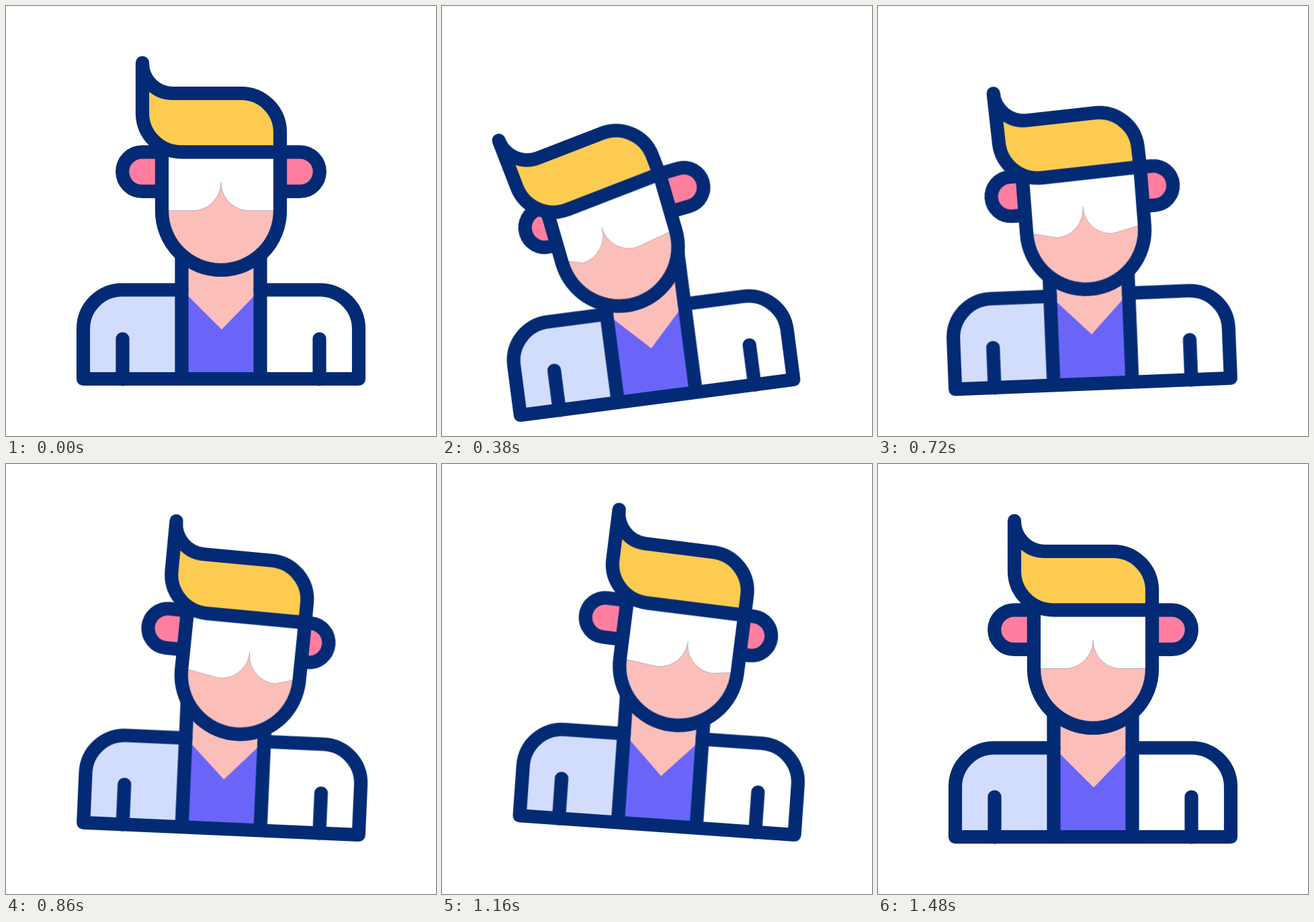
Animation of 640 by 640 pixels, one loop 1.7 s. Source, as an HTML page:

```html
<!DOCTYPE html>
<html lang="en">
<head>
<meta charset="utf-8">
<title>Head tilt</title>
<style>
  html, body { margin: 0; width: 100%; height: 100%; overflow: hidden; background: #fff; }
  svg { display: block; width: 100%; height: 100%; }

  .line { fill: none; stroke: #032b75; stroke-width: 20.2; stroke-linecap: round; stroke-linejoin: round; }
  .hair-shape { fill: #fdcb50; }
  .ear { fill: #ff7ea0; }
  .skin { fill: #fcbeb9; }
  .white { fill: #fff; }
  .sleeve { fill: #d2dcfd; }
  .shirt { fill: #6a65f8; }
  .seam { stroke: #032b75; stroke-width: .5; stroke-opacity: .5; }

  .body, .head, .hair, .ear, .jaw {
    animation: 1700ms cubic-bezier(.33, 0, .67, 1) infinite;
  }
  .body { transform-origin: 320px 555px; animation-name: sway; }
  .head { transform-origin: 320px 305px; animation-name: tilt; }
  .hair { transform-origin: 408px 217px; animation-name: flop; }
  .ear.left { animation-name: ear-left; }
  .ear.right { animation-name: ear-right; }
  .jaw { animation-name: look; }

  @keyframes sway {
    0%, 87.06%, 100% { transform: translate(0, 0) rotate(0deg); }
    27.65% { transform: translate(0, 30.4px) rotate(-8.2deg); }
    59.8% { transform: translate(0, -22.6px) rotate(5.2deg); }
  }
  @keyframes tilt {
    0%, 81.5%, 100% { transform: translate(0, 0) rotate(0deg); }
    27.06% { transform: translate(-29.5px, 22.5px) rotate(-9.5deg); }
    57.9% { transform: translate(26.5px, 20px) rotate(5.4deg); }
  }
  @keyframes flop {
    0%, 57.9%, 100% { transform: rotate(0deg); }
    21.2% { transform: rotate(-5deg); }
  }
  @keyframes ear-left {
    0%, 57.9%, 100% { transform: translateX(0); }
    27.06% { transform: translateX(21px); }
  }
  @keyframes ear-right {
    0%, 27.06%, 83.5%, 100% { transform: translateX(0); }
    57.9% { transform: translateX(-24px); }
  }
  /* the cheeks stay pinned while the lens edge slides */
  @keyframes look {
    0%, 82.5%, 100% { d: path("M242 304.5L278 304.5C301 304.5 320 285.5 320 262C320 285.5 339 304.5 362 304.5L398 304.5A78 78 0 0 1 242 304.5Z"); }
    27.06% { d: path("M242 304.5L260 313.5C283 313.5 302 294.5 302 271C302 294.5 321 313.5 344 313.5L398 304.5A78 78 0 0 1 242 304.5Z"); }
    57.9% { d: path("M242 304.5L293 312C316 312 335 293 335 269.5C335 293 354 312 377 312L398 304.5A78 78 0 0 1 242 304.5Z"); }
  }
</style>
</head>
<body>
<svg viewBox="0 0 640 640">
  <g class="body">
    <path class="sleeve" d="M115 555V480.5A58 58 0 0 1 173 422.5H261.5V555Z"/>
    <path class="white" d="M525 555V480.5A58 58 0 0 0 467 422.5H378.5V555Z"/>
    <path class="skin" d="M261.5 320H378.5V500H261.5Z"/>
    <path class="shirt" d="M261.5 422L321 481.5L378.5 422V555H261.5Z"/>
    <path class="line" d="M261.5 422.5H173A58 58 0 0 0 115 480.5V555H525V480.5A58 58 0 0 0 467 422.5H378.5"/>
    <path class="line" d="M261.5 320V555M378.5 320V555M173.5 495.5V555.5M466.5 495.5V555.5"/>

    <g class="head">
      <path class="line ear left" d="M232 217.3H202.5A29.3 29.3 0 0 0 202.5 275.9H232Z"/>
      <path class="line ear right" d="M408 217.3H437.5A29.3 29.3 0 0 1 437.5 275.9H408Z"/>
      <path class="white" d="M232 217V305A88 88 0 0 0 408 305V217Z"/>
      <path class="skin" d="M242 304.5A78 78 0 0 0 398 304.5L408 305A88 88 0 0 1 232 305Z"/>
      <path class="skin seam jaw" d="M242 304.5L278 304.5C301 304.5 320 285.5 320 262C320 285.5 339 304.5 362 304.5L398 304.5A78 78 0 0 1 242 304.5Z"/>
      <path class="line" d="M232 217V305A88 88 0 0 0 408 305V217"/>
      <g class="hair">
        <path class="line hair-shape" d="M203 84.5V159.5A58 58 0 0 0 261 217.3H408V188A58 58 0 0 0 350 130H248A45 45 0 0 1 203 84.5Z"/>
      </g>
    </g>
  </g>
</svg>
</body>
</html>
```
